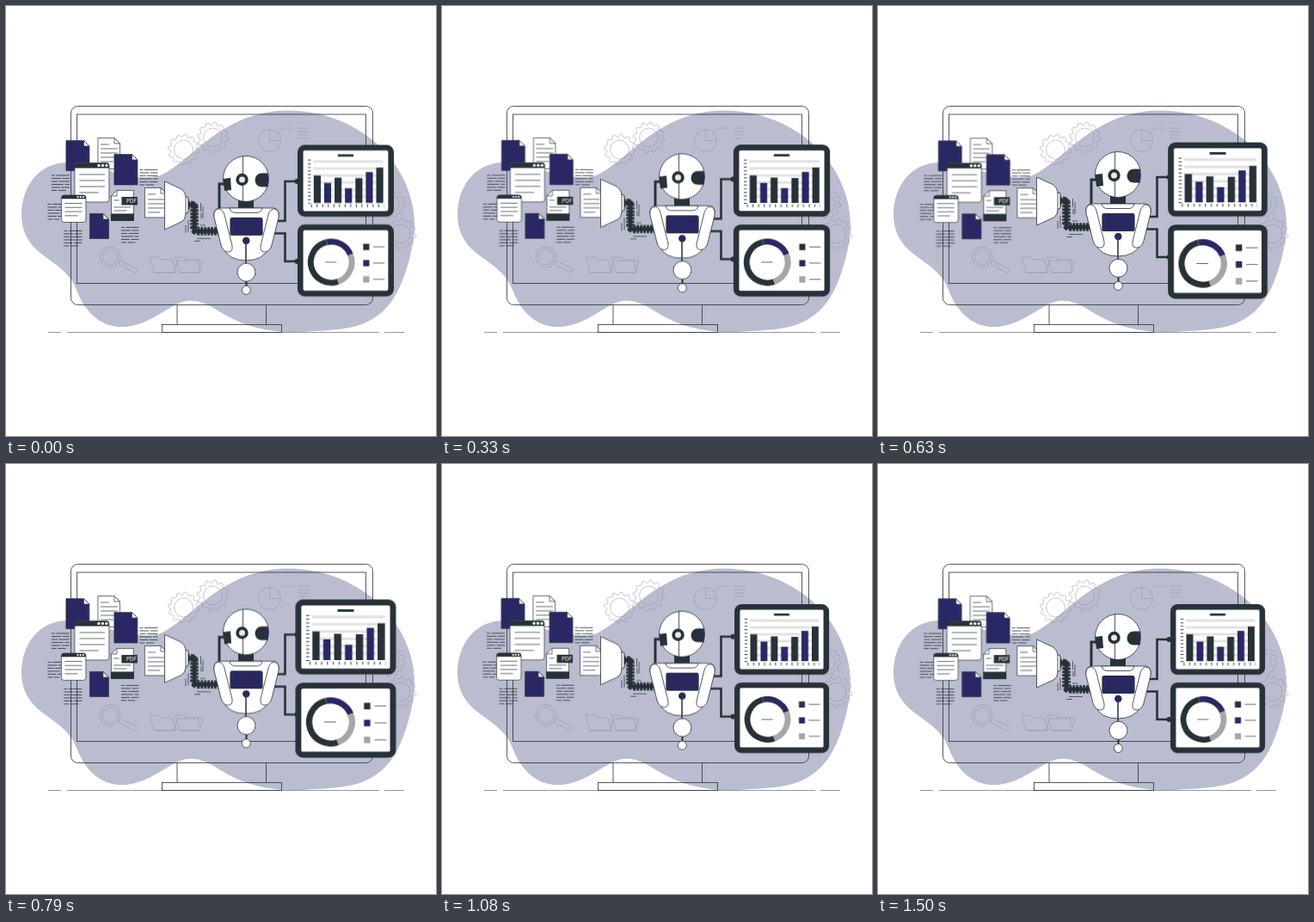
Recreate the animation shown at these times as an HTML page. Size 500 by 500 pixels, loop 1.54 s.

```html
<!DOCTYPE html>
<html lang="en">
<head>
<meta charset="utf-8">
<title>Data robot</title>
<style>
html, body { margin: 0; width: 100%; height: 100%; overflow: hidden; background: #fff; }
svg { display: block; width: 100vw; height: 100vh; --ink: #263238; --navy: #2a2765; }
.line { fill: none; stroke: var(--ink); }
.white { fill: #fff; stroke: var(--ink); }
.ink { fill: var(--ink); }
.navy { fill: var(--navy); }
.faint { fill: none; stroke: #8e909f; stroke-width: .5; }
.float { animation: float 1540ms linear infinite; }
.drift { animation: drift 1540ms linear infinite; }
.beat { transform-origin: 395.5px 249.5px; animation: beat 1540ms linear infinite; }
@keyframes float {
  0%, 97.4%, 100% { transform: translateY(0); }
  48.7% { transform: translateY(-6px); }
}
@keyframes drift {
  0%, 100% { transform: translate(0, 0); }
  8.4% { transform: translate(-.7px, -.4px); }
  21.4% { transform: translate(-.6px, -.3px); }
  40.9% { transform: translate(.3px, .2px); }
  51.3% { transform: translate(-.2px, 0); }
  70.1% { transform: translate(-1px, -.3px); }
  97.4% { transform: translate(.2px, .1px); }
}
@keyframes beat {
  0% { transform: scale(1.007); }
  9.4%, 45.8% { transform: scale(1.1); }
  24.5%, 36%, 60.7%, 97.4% { transform: scale(1); }
  100% { transform: scale(1.007); }
}
</style>
</head>
<body>
<svg viewBox="0 0 500 500">
  <path fill="#bbbcd0" d="M18 243C18 210 38 183 70 182C105 181 137 205 177 198C202 188 226 158 257 141C279 128 303 121.500 328 121.500C366 121.500 402 135 430 159C458 184 475 219 475 254C475 266 472 283 470 291C461 325 450 350 426 364C404 378 371 377 344 379C309 381 277 373 251 357C237 348 225 341 210 343C190 346 171 370 139 373C110 375 92 356 82 330C73 306 50 297 34 282C23 271 18 257 18 243Z"/>
  <g id="decor" class="faint">
    <circle cx="306.500" cy="156.500" r="13"/>
    <path d="M306.500 143.500V156.500H319.500M317 148L322 142H334M339 142H352M339 146H352M339 150H352M339 154H352"/>
    <circle cx="121" cy="292" r="12"/><circle cx="121" cy="292" r="9"/>
    <path d="M131 298L134 296.500L151 305Q154 309 149 310L132 301Z"/>
    <path d="M172 310L167 292H178L180 295H193L198 310ZM172 310H195L200 296M202 310L197 292H208L210 295H223L226 310ZM202 310H225L229 296H200"/>
  </g>
  <g class="line" stroke-width=".8">
    <rect x="75.500" y="116.500" width="351" height="231" rx="8"/>
    <rect x="82.500" y="126" width="336" height="196.500"/>
    <path d="M199 347.500V370.500M302.500 347.500V370.500"/>
    <path stroke-width=".5" d="M49 379.500H64M71 379.500H434M440 379.500H463"/>
    <rect x="181.500" y="370.500" width="139" height="9"/>
  </g>
  <g id="docs" class="drift"></g>
  <g class="float">
    <path class="line" stroke-width=".7" d="M226.500 229V239M229 233V247M227 241V247M212 249V263M209 255V264M222 270.500H238M219 273.500H226M226 255H232"/>
    <path class="line" stroke-width="5" d="M211 231.500H219V262H248"/>
    <path class="line" stroke-width="9.500" stroke-dasharray="2.700 1.200" d="M211 231.500H216Q219 231.500 219 235V258Q219 262 223 262H248"/>
    <rect class="white" x="207.500" y="222" width="4.500" height="19" rx="2"/>
    <path class="white" stroke-width=".8" d="M184.500 204L203 212.500Q209 216 209 224V240Q209 249 203 251.500L184.500 260Z"/>
    <path class="line" stroke-width="2.600" d="M308 250H324.500V204H339M308 264.500H324.500V297H339"/>
    <circle class="ink" cx="338.500" cy="204" r="3"/><circle class="ink" cx="338.500" cy="297" r="3"/>
  </g>
  <g id="panels" class="beat">
    <rect x="343.200" y="166.200" width="103.600" height="75.600" rx="5" class="white" stroke-width="6.500"/>
    <rect x="343.200" y="257.200" width="103.600" height="75.600" rx="5" class="white" stroke-width="6.500"/>
    <rect class="ink" x="386" y="173.700" width="18" height="2.700"/>
    <path stroke="#e3e3e3" stroke-width="3" d="M358 182H438M358 190H438M358 198H438M358 206H438M358 214H438M358 222H438"/>
    <path class="line" stroke-width="3.500" stroke-dasharray=".9 3.200" d="M353.500 180V231"/>
    <path class="line" stroke-width="3.500" stroke-dasharray=".9 5.500" d="M355.500 232.500H439"/>
    <g id="ring" fill="none" stroke-width="6.800"></g>
    <path class="line" stroke-width=".7" d="M371.500 297H384.500M426.500 279.500H439.500M426.500 298H439.500M426.500 316.500H439.500"/>
    <rect class="ink" x="415" y="276" width="7" height="7.200"/>
    <rect class="navy" x="415" y="294.500" width="7" height="7.200"/>
    <rect fill="#a6a6a6" x="415" y="313" width="7" height="7.200"/>
  </g>
  <g class="float">
    <path class="line" stroke-width="3" d="M248 240V207H256"/>
    <rect class="ink" x="270" y="225" width="18" height="11"/>
    <g class="white" stroke-width=".8">
      <circle cx="279" cy="201" r="26.500"/>
      <path d="M275.500 174.500V227.500" fill="none"/>
      <path d="M248 235H311Q318 236 317 244L306 281Q299 296 279 296Q259 296 252 281L242 244Q241 236 248 235Z"/>
      <path d="M246 236Q252 235.500 254 243L263 279Q264 287 257 286Q252 285 250 278L242 246Q241 238 246 236ZM313 236Q307 235.500 305 243L296 279Q295 287 302 286Q307 285 309 278L317 246Q318 238 313 236Z"/>
      <path d="M260 235H298Q297 240 292 240.500H266Q261 240 260 235Z"/>
      <path d="M279 277V300" fill="none" stroke-width="1.500"/>
      <circle cx="279.500" cy="309.800" r="10.500"/>
      <path d="M279.500 320V326" stroke-width="2"/>
      <circle cx="279.300" cy="330.500" r="5"/>
    </g>
    <path class="ink" d="M252.500 201L261 200L262 214L254 215Z"/>
    <circle class="ink" cx="274.500" cy="202" r="7.200"/>
    <circle cx="274.500" cy="202" r="3.500" fill="#e8e8f0"/>
    <path class="ink" d="M304.500 194.500H297.500A8 8 0 0 0 297.500 210.500H304.500Z"/>
    <path class="navy" d="M302.500 195H304.500Q306 202 304.500 210H302.500Z"/>
    <rect class="navy" x="261" y="246.500" width="37" height="20" rx="2" stroke="#263238" stroke-width="1.200"/>
    <path class="line" stroke-width=".8" d="M265 251H273V256H284V251H293M265 262H270V257M276 262H283V258M289 256V262H294"/>
    <circle class="navy" cx="279.300" cy="273" r="3.800" stroke="#263238"/>
  </g>
</svg>
<script>
const add = (id, markup) => document.getElementById(id).insertAdjacentHTML('beforeend', markup);
const path = (d, cls, extra = '') => `<path class="${cls}" d="${d}" ${extra}/>`;
const thin = 'stroke-width=".7"';

// Evenly spaced lines of writing inside a page
function rows(x, y, width, count, step) {
  let d = '';
  for (let i = 0; i < count; i++) d += `M${x} ${y + i * step}h${i === count - 1 ? width * .75 : width}`;
  return path(d, 'line', thin);
}

function page(x, y, w, h, cls) {
  const fold = 6.5;
  return path(`M${x} ${y}h${w - fold}l${fold} ${fold}v${h - fold}h${-w}Z`, cls, thin + ' stroke="#263238"') +
    path(`M${x + w - fold} ${y}v${fold}h${fold}Z`, 'white', thin);
}

function browser(x, y, w, h, bar) {
  let s = `<rect class="white" ${thin} x="${x}" y="${y}" width="${w}" height="${h}" rx="3"/>` +
    path(`M${x} ${y + bar}v${3 - bar}q0-3 3-3h${w - 6}q3 0 3 3v${bar - 3}Z`, 'ink');
  for (let i = 0; i < 3; i++)
    s += `<circle cx="${x + w - 3 - i * bar * .75}" cy="${y + bar / 2}" r="${bar * .27}" fill="#fff"/>`;
  return s;
}

// Broken short lines that stand for a paragraph
function blurb(x, y, w) {
  let d = '';
  for (let i = 0; i < 6; i++) {
    const cut = 4 + (i * 7) % 11;
    d += `M${x} ${y + i * 3.5}h${cut}m1.5 0h${(i === 5 ? w * .8 : w) - cut - 1.5}`;
  }
  return path(d, 'line', 'stroke-width=".8"');
}

function gear(cx, cy, r) {
  const teeth = 12, pts = [];
  for (let i = 0; i < teeth * 4; i++) {
    const a = (i + .5) / (teeth * 4) * 2 * Math.PI;
    const q = i % 4 < 2 ? r : r - 3;
    pts.push((cx + q * Math.cos(a)).toFixed(1) + ' ' + (cy + q * Math.sin(a)).toFixed(1));
  }
  return path(`M${pts.join('L')}Z`, 'faint') + `<circle cx="${cx}" cy="${cy}" r="${r * .61}"/>`;
}

add('decor', gear(206.5, 167, 18) + gear(240.5, 153, 18) + gear(447, 230, 17) + gear(459, 265, 18));

add('docs',
  [[53, 197, 21], [48.5, 230.5, 17], [67.5, 261.5, 21], [134, 257.5, 20.5], [155.5, 190.5, 21]]
    .map(b => blurb(...b)).join('') +
  page(70, 156.5, 27, 35, 'navy') +
  page(107, 153.5, 25.5, 36, 'white') + rows(110, 161, 13, 1, 5) + rows(110, 166, 20, 4, 5) +
  browser(80, 182.5, 40, 45.5, 6) + rows(85.5, 196, 29.5, 4, 7) +
  page(126, 172.5, 27, 35.5, 'navy') +
  browser(64.5, 220, 28.5, 31.5, 4.2) + rows(68.5, 229.5, 20, 4, 4.8) +
  path('M129 214.5H148.500V249.500H122.500V221Z', 'white', thin) +
  path('M129 214.5V221H122.500', 'line', thin) +
  rows(125.5, 226, 8, 1, 4) + rows(125.5, 234, 20, 2, 4) +
  '<rect class="ink" x="122" y="241.500" width="27" height="8.500"/>' +
  '<rect class="ink" x="134.500" y="222" width="18.500" height="9.500"/>' +
  '<text x="140" y="229.300" font-family="Roboto, Arial, sans-serif" font-size="6.500" fill="#fff">PDF</text>' +
  page(97.5, 241.5, 22, 29, 'navy') +
  page(161.5, 211.5, 25, 34.5, 'white') + rows(165, 219, 12, 1, 5) + rows(165, 225, 19, 4, 5));

add('panels', [198, 206.5, 200.5, 212.5, 201, 194, 189].map((top, i) =>
  `<rect class="${i % 2 ? 'navy' : 'ink'}" x="${358.5 + i * 11.9}" y="${top}" width="8" height="${229.3 - top}"/>`).join(''));

add('ring', [[-12, 80, '#2a2765'], [68, 93, '#a6a6a6'], [161, 187, '#263238']].map(([from, span, color]) =>
  `<circle cx="378.500" cy="297" r="23.500" pathLength="360" stroke="${color}" stroke-dasharray="${span} 360" transform="rotate(${from - 90} 378.500 297)"/>`).join(''));
</script>
</body>
</html>
```
